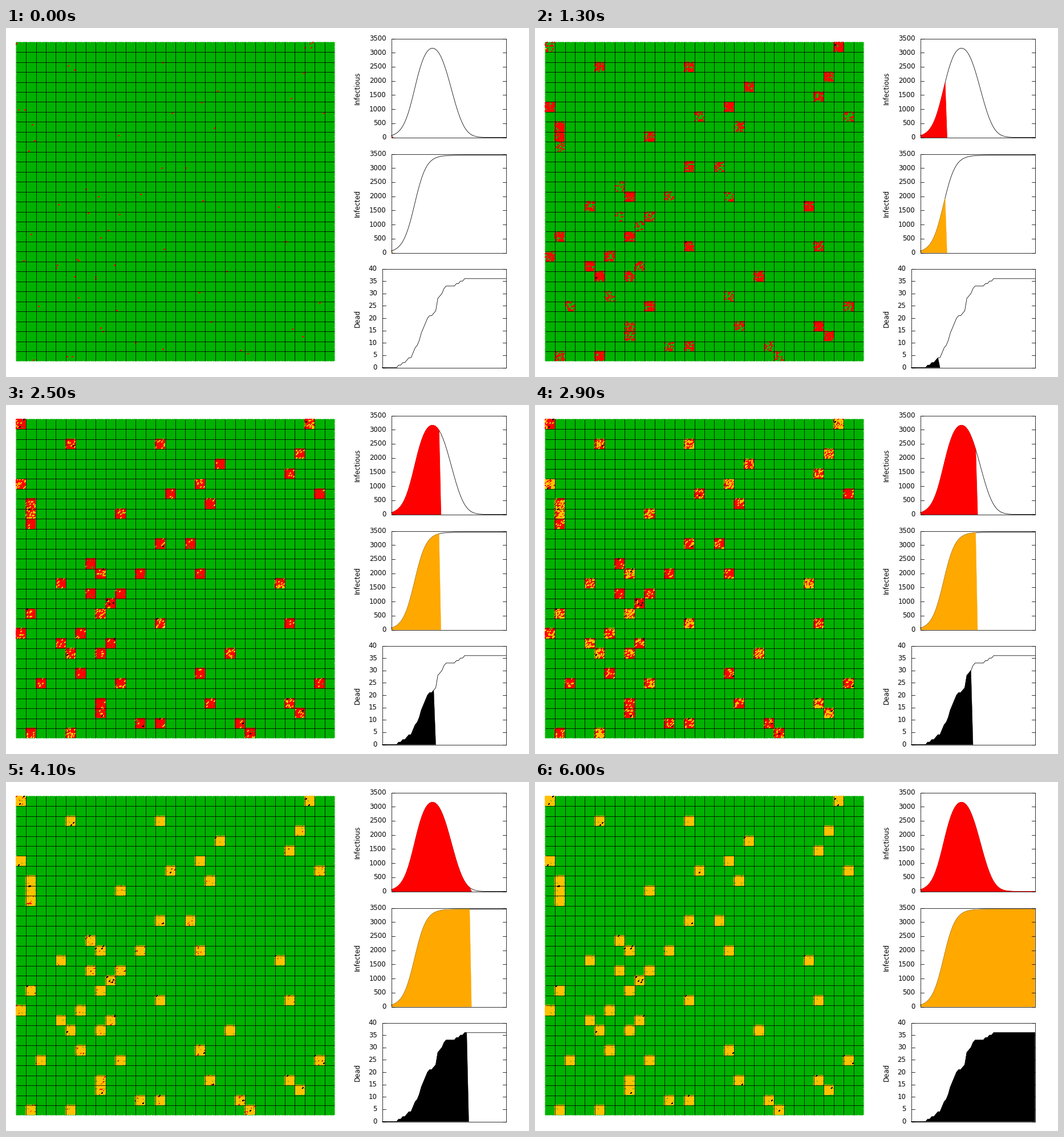
These frames come from a looping animation (917 px wide and 611 px high, 6.1 s). A matplotlib script:

```python
from math import erf

import numpy as np
import matplotlib.pyplot as plt
from matplotlib.animation import FuncAnimation
from matplotlib.patches import Polygon, Rectangle

W, H, DPI = 917, 611, 64
PT = 72 / DPI                       # points per pixel
FRAMES = 61
X0, Y0, CELL = 17.1, 24.2, 17.46    # map origin and size of one block
SIDE = 32                           # blocks along each side of the map
STEP = CELL / 8                     # eight people along each block side
TOTAL = 3454                        # infected in the end

GREEN, RED, GOLD, BLACK = (0, 178, 0), (255, 0, 0), (255, 194, 0), (0, 0, 0)

# Blocks with an outbreak, counted row by row, fastest outbreak first.
OUTBREAKS = np.array([
    29, 192, 289, 923, 210, 616, 257, 488, 741, 956, 708, 538, 757, 997,
    654, 842, 124, 78, 69, 609, 148, 187, 672, 744, 678, 398, 298, 667,
    275, 915, 974, 516, 862, 401, 993, 904, 936, 554, 806, 818, 254, 713,
    239, 834, 972, 1015, 982, 455, 0, 492, 321, 498, 551, 585])

# ---- curves -------------------------------------------------------------
steps = np.arange(FRAMES)
infected = np.round(TOTAL / (1 + np.exp(-0.326 * (steps - 12.25)))).astype(int)
dead = np.round(np.interp(
    steps,
    [7, 14, 18, 20, 22, 25, 26, 27, 31, 35, 40],
    [0, 4.3, 11, 16, 20, 22, 23, 28, 33, 33, 36])).astype(int)
cured_share = np.array([(1 + erf((k - 31.5) / 7.7)) / 2 for k in steps])
recovered = np.round((TOTAL - dead[-1]) * cured_share).astype(int)
infectious = np.maximum(infected - recovered - dead, 0)

# ---- people -------------------------------------------------------------
rng = np.random.default_rng(7)
blocks = np.column_stack([OUTBREAKS % SIDE, OUTBREAKS // SIDE])
local = np.array([(c, r) for r in range(8) for c in range(8)])
people = (blocks[:, None] * 8 + local).reshape(-1, 2)


def rank(score):
    return np.argsort(np.argsort(score))


middle = np.repeat(np.linspace(8, 16, len(blocks)), 64)
onset = rng.logistic(middle, 2.5)
victims = rng.choice(len(people), dead[-1], replace=False)
death_time = np.searchsorted(dead, np.arange(1, len(victims) + 1))
onset[victims] = np.minimum(onset[victims], death_time - 5)
first_cases = np.arange(len(blocks)) * 64 + rng.integers(64, size=len(blocks))
onset[first_cases] = -100
onset_rank = rank(onset)

cure = np.maximum(onset, 0) + rng.normal(18, 3, len(people))
cure[victims] = np.inf
cure[onset_rank >= TOTAL] = np.inf
cure_rank = rank(cure)

# ---- map ----------------------------------------------------------------
corner = np.round((X0, Y0) + (people + 0.5) * STEP - 1.5).astype(int)
DOT = [(dx, dy) for dx in range(3) for dy in range(3)
       if (dx, dy) not in ((0, 0), (2, 2))]


def stamp(img, chosen, color):
    x, y = corner[chosen].T
    for dx, dy in DOT:
        img[y + dy, x + dx] = color


# Green field with a scalloped rim.
base = np.full((H, W, 3), 255, np.uint8)
base[25:583, 18:576] = GREEN
dots = (np.arange(SIDE * 8) + 0.5) * STEP - 0.5
xs = np.round(X0 + dots).astype(int)
ys = np.round(Y0 + dots).astype(int)
base[24, xs] = base[583, xs] = GREEN
base[ys, 17] = base[ys, 576] = GREEN


def draw_map(k):
    img = base.copy()
    ill = onset_rank < infected[k]
    well = ill & (cure_rank < recovered[k])
    stamp(img, ill & ~well, RED)
    stamp(img, well, GOLD)
    stamp(img, victims[:dead[k]], BLACK)
    return img


# ---- figure -------------------------------------------------------------
fig = plt.figure(figsize=(W / DPI, H / DPI), dpi=DPI, facecolor="white")
ax = fig.add_axes([0, 0, 1, 1])
ax.axis("off")
picture = ax.imshow(draw_map(0), extent=(0, W, H, 0), interpolation="nearest",
                    aspect="auto", zorder=0)
ax.set_xlim(0, W)
ax.set_ylim(H, 0)
FONT = dict(family="DejaVu Sans", size=11.7 * PT, color="black")
THIN = dict(color="black", lw=0.8 * PT)

for i in range(1, SIDE):
    x, y = np.floor([X0 + i * CELL, Y0 + i * CELL]) + 0.5
    ax.plot([x, x], [25, 583], zorder=1, solid_capstyle="butt", **THIN)
    ax.plot([18, 576], [y, y], zorder=1, solid_capstyle="butt", **THIN)


class Chart:
    RIGHT, HEIGHT = 876.5, 173

    def __init__(self, name, values, left, top, limit, tick, color, edge):
        right, bottom = self.RIGHT, top + self.HEIGHT
        self.bottom = bottom
        self.x = np.linspace(left, right, FRAMES)
        self.y = bottom - values * self.HEIGHT / limit
        ax.plot(self.x, self.y, zorder=2, **THIN)

        frame = dict(xy=(left, top), width=right - left, height=self.HEIGHT)
        self.fill = ax.add_patch(Polygon([(left, bottom)] * 3, closed=True,
                                         facecolor=color, edgecolor=color,
                                         lw=edge * PT, zorder=3))
        self.fill.set_clip_path(Rectangle(**frame, transform=ax.transData))
        ax.add_patch(Rectangle(**frame, fill=False, zorder=4, **THIN))

        for v in range(0, limit + 1, tick):
            y = bottom - v * self.HEIGHT / limit
            ax.plot([left, left + 6], [y, y], zorder=4, **THIN)
            ax.plot([right - 6, right], [y, y], zorder=4, **THIN)
            ax.text(left - 9, y, str(v), ha="right", va="center", **FONT)
        ax.text(616, top + self.HEIGHT / 2, name, rotation=90, ha="center",
                va="center", **FONT)

    def show(self, k):
        """Fill up to step k, then fall to zero within one step."""
        end = self.x[min(k + 1, FRAMES - 1)]
        curve = list(zip(self.x[:k + 1], self.y[:k + 1]))
        self.fill.set_xy([(self.x[0], self.bottom)] + curve
                         + [(end, self.bottom)])


charts = [
    Chart("Infectious", infectious, 675.5, 18.5, 3500, 500, "#ff0000", 0.9),
    Chart("Infected", infected, 675.5, 220.5, 3500, 500, "#ffa800", 0.4),
    Chart("Dead", dead, 659.5, 421.5, 40, 5, "#000000", 0.4),
]


def update(k):
    picture.set_data(draw_map(k))
    for chart in charts:
        chart.show(k)
    return [picture] + [c.fill for c in charts]


anim = FuncAnimation(fig, update, frames=FRAMES, interval=100, repeat=True,
                     repeat_delay=0, blit=False)
plt.show()
```
